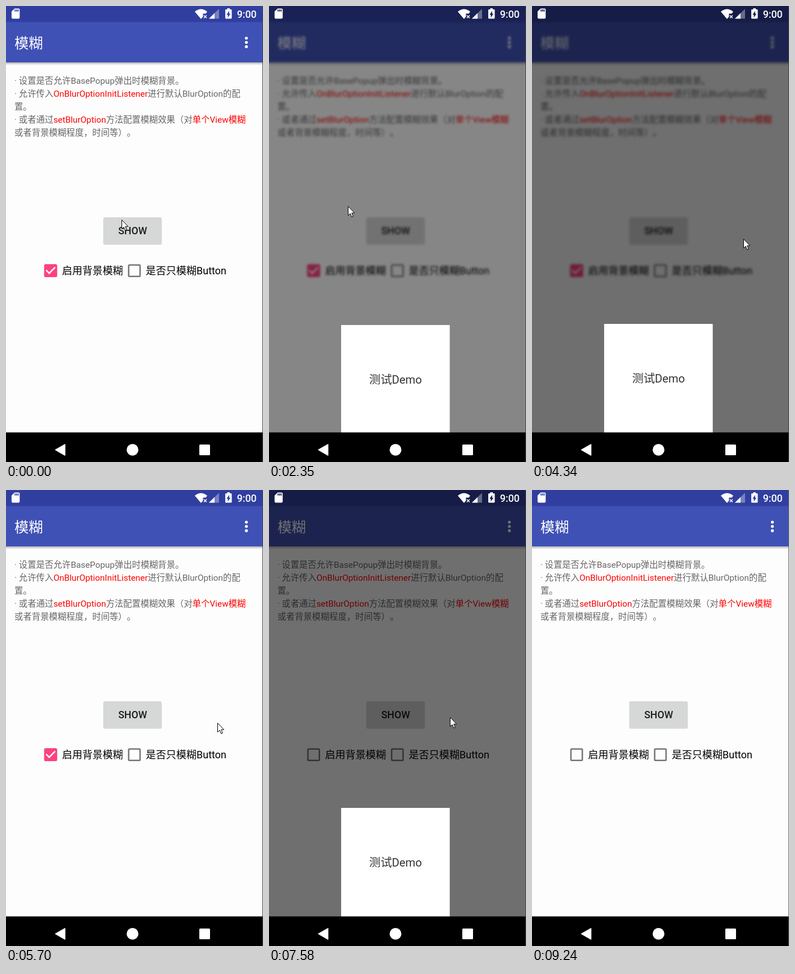
An HTML page for the animation above (9.3 s loop, 456x809 px).

```html
<!DOCTYPE html>
<html lang="zh-CN">
<head>
<meta charset="utf-8">
<title>模糊</title>
<style>
  html, body { margin: 0; width: 100%; height: 100%; overflow: hidden; background: #fdfdfd; }
  svg { display: block; width: 456px; height: 809px; }
  text {
    font: 18px Roboto, "Noto Sans CJK SC", "Noto Sans CJK", sans-serif;
    text-spacing-trim: space-all;
  }
  .medium { font-size: 17.7px; font-weight: 500; }
  .note { font-size: 15.35px; fill: #666; }
  .note tspan { fill: #f00; }
  #blur { filter: blur(2px); }
</style>
</head>
<body>
<svg viewBox="0 0 456 809">
  <defs>
    <linearGradient id="shade" x2="0" y2="1">
      <stop stop-color="#000" stop-opacity=".3"/>
      <stop offset="1" stop-color="#000" stop-opacity="0"/>
    </linearGradient>
    <rect id="box" x="4" y="4" width="16" height="16" rx="1" fill="none" stroke="#757575" stroke-width="2"/>
  </defs>

  <g id="app">
    <path fill="#fdfdfd" d="M0 0H456V757H0Z"/>
    <path fill="#3f51b5" d="M0 0H456V100H0Z"/>
    <path fill="#303f9f" d="M0 0H456V28.5H0Z"/>
    <path fill="url(#shade)" d="M0 100H456V105H0Z"/>
    <text x="15" y="74.5" fill="#fff" style="font-size:25.3px">模糊</text>
    <g fill="#fff">
      <circle cx="426.5" cy="57" r="2.6"/><circle cx="426.5" cy="64.6" r="2.6"/><circle cx="426.5" cy="72.2" r="2.6"/>
    </g>
    <text class="note" x="15" y="137.5">· 设置是否允许BasePopup弹出时模糊背景。</text>
    <text class="note" x="15" y="160.5">· 允许传入<tspan>OnBlurOptionInitListener</tspan>进行默认BlurOption的配</text>
    <text class="note" x="15" y="183.5">置。</text>
    <text class="note" x="15" y="206.5">· 或者通过<tspan>setBlurOption</tspan>方法配置模糊效果（对<tspan>单个View模糊</tspan></text>
    <text class="note" x="15" y="229.5">或者背景模糊程度，时间等）。</text>

    <rect x="172.5" y="375.5" width="104" height="48" rx="2.5" opacity=".15"/>
    <rect x="173" y="374.8" width="103" height="47.2" rx="2.5" fill="#d6d7d7"/>
    <g id="ripple">
      <rect x="172.5" y="376" width="104" height="48" rx="2.5" opacity=".15"/>
      <rect x="173" y="374.8" width="103" height="47.2" rx="2.5" fill="#bfc2c1"/>
    </g>
    <text class="medium" x="224.7" y="405" text-anchor="middle" fill="#1c1c1c">SHOW</text>

    <use href="#box" transform="translate(212.6 454.4) scale(1.264)"/>
    <g transform="translate(64 454.4) scale(1.264)">
      <use href="#box"/>
      <g id="check">
        <rect x="3" y="3" width="18" height="18" rx="2" fill="#ff4081"/>
        <path d="M10 17L5 12L6.4 10.6L10 14.2L17.6 6.6L19 8Z" fill="#fff"/>
      </g>
    </g>
    <circle id="halo" cx="79" cy="469.7" r="25" opacity="0"/>
    <text x="99.5" y="476.3">启用背景模糊</text>
    <text x="248" y="476.3">是否只模糊Button</text>
  </g>
  <use id="blur" href="#app"/>
  <path id="dim" d="M0 0H456V757H0Z"/>

  <g id="popup">
    <path fill="#fff" d="M128 564H320.7V757H128Z"/>
    <text x="224.5" y="668" text-anchor="middle" fill="#333" style="font-size:20.2px">测试Demo</text>
  </g>

  <g fill="#fff">
    <path transform="translate(6.3 2.6) scale(.9)" fill-rule="evenodd" d="M18 2H10L4 8V20Q4 22 6 22H18Q20 22 20 20V4Q20 2 18 2ZM12 8H10V4H12ZM15 8H13V4H15ZM18 8H16V4H18Z"/>
    <path d="M335 10Q346 1 357 10L354.5 13.5H349.5V19L346 23Z"/>
    <path d="M351 16.5L356 21.5M356 16.5L351 21.5" stroke="#fff" stroke-width="1.5"/>
    <path d="M360 22.5L378 5V22.5Z" opacity=".35"/>
    <path d="M360 22.5L370 12.8V22.5Z"/>
    <path transform="translate(381 2.2) scale(1.15 .92)" fill-rule="evenodd" d="M15.7 4H14V2H10V4H8.3Q7 4 7 5.3V20.7Q7 22 8.3 22H15.7Q17 22 17 20.7V5.3Q17 4 15.7 4ZM11 20V14.5H9L13 7V12.5H15Z"/>
    <text class="medium" x="409.8" y="20.5">9:00</text>
    <path fill="#000" d="M0 756.5H456V809H0Z"/>
    <path d="M87.8 787.4L104.6 777.8V797Z" stroke="#fff" stroke-width="1.5" stroke-linejoin="round"/>
    <circle cx="224.5" cy="787.4" r="10.4"/>
    <rect x="343" y="778" width="19" height="19" rx="1.5"/>
  </g>
  <path id="edge" d="M455 0H456V809H455Z" fill="#444"/>
  <path id="cursor" d="M.5 .5V16.5L4.2 13.2L6.8 19.3L9.3 18.2L6.8 12.2H11.7Z" fill="#fff" stroke="#000"/>
</svg>

<script>
const LOOP = 9300, UNCHECK = 6080;
const el = id => document.getElementById(id);
const clamp = v => Math.min(1, Math.max(0, v));
const ease = v => (1 - Math.cos(Math.PI * clamp(v))) / 2;
const decelerate = v => 1 - (1 - clamp(v)) ** 2;
const fade = (id, v) => el(id).setAttribute('opacity', v);
const move = (id, x, y) => el(id).setAttribute('transform', `translate(${x} ${y})`);

const shows = [
  { press: 810, open: 930, close: 2350, blur: 1 },
  { press: 3608, open: 3562, close: 5300, blur: 1 },
  { press: 6750, open: 6880, close: 8110, blur: 0 }
];

// time, x, y
const path = [
  [0, 205, 379], [180, 205, 379], [210, 209, 380], [550, 209, 380], [610, 209, 384],
  [1840, 209, 384], [2010, 140, 355], [2800, 140, 355], [3260, 177, 413],
  [3350, 259, 413], [3440, 219, 413], [4000, 219, 413], [4330, 375, 413],
  [5740, 375, 413], [6040, 92, 469], [6230, 92, 469], [6260, 93, 469], [6430, 93, 469],
  [6720, 225, 402], [7440, 225, 402], [7580, 321, 403], [8420, 321, 403], [8780, 330, 812],
  [LOOP, 330, 812]
];

function cursorAt(t) {
  const i = path.findIndex(p => p[0] > t);
  const [t0, x0, y0] = path[i - 1], [t1, x1, y1] = path[i];
  const k = ease((t - t0) / (t1 - t0));
  return [Math.round(x0 + (x1 - x0) * k), Math.round(y0 + (y1 - y0) * k)];
}

function render(t) {
  let dim = 0, rise = 0, blur = 0, ripple = 0;
  const s = shows.findLast(s => t >= s.press);
  if (s) {
    const age = t - s.open;
    const gone = t < s.close ? 0 : t - s.close + 28;
    dim = .56 * clamp(age / 200) * (1 - clamp(gone / 180));
    rise = ease((age - 65) / 300) * (1 - ease(gone / 400));
    blur = s.blur * decelerate((age - 60) / 400) * (1 - clamp(gone / 400));
    ripple = clamp((t - s.press) / 30) * clamp((s.press + 300 - t) / 200);
  }
  fade('dim', dim);
  fade('blur', blur);
  fade('ripple', ripple);
  move('popup', 0, Math.round(193 * (1 - rise)));
  fade('check', 1 - clamp((t - UNCHECK) / 120));
  fade('halo', t < UNCHECK ? 0 : .1 * clamp((UNCHECK + 150 - t) / 150));
  el('edge').setAttribute('fill', t < 9240 ? '#444' : '#666');
  move('cursor', ...cursorAt(t));
}

function tick() {
  render(performance.now() % LOOP);
  requestAnimationFrame(tick);
}
tick();
</script>
</body>
</html>
```
